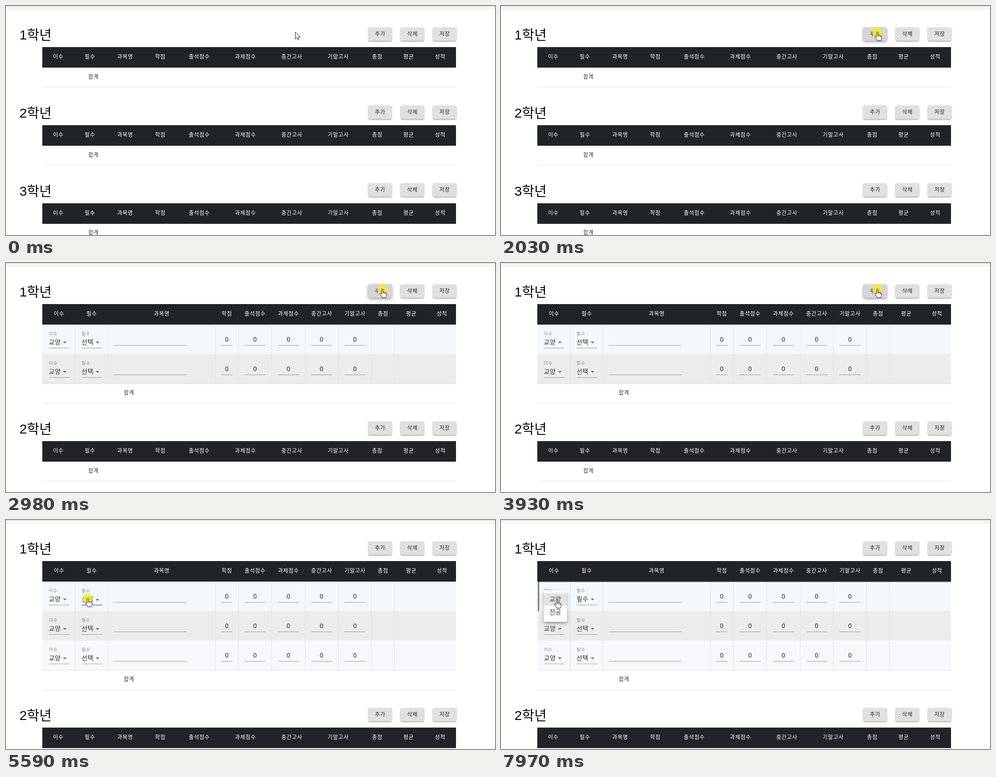
Recreate the animation shown at these times as an HTML page with a canvas. Size 1091x513 px, loop 8 s.

```html
<!DOCTYPE html>
<html lang="ko">
<head>
<meta charset="utf-8">
<style>
html, body { margin: 0; width: 100%; height: 100%; overflow: hidden; background: #fff; }
canvas { display: block; }
</style>
</head>
<body>
<canvas id="stage" width="1091" height="513"></canvas>
<script>
const ctx = document.getElementById('stage').getContext('2d');
const LOOP = 8000, ROW = 66.1, SECTION = 174.7;
const KR = '"Noto Sans CJK KR", "Noto Sans CJK", sans-serif';

const heads = ['이수', '필수', '과목명', '학점', '출석점수', '과제점수', '중간고사', '기말고사', '총점', '평균', '성적'];
const emptyCols = [116.5, 187, 265.5, 344, 431, 534, 637.5, 741, 828, 898, 968.5];
const filledCols = [118, 191, 347, 492.5, 555.5, 630, 704, 778.5, 841, 904, 972.5];
const dividers = [154, 227, 467, 518, 592, 667, 741, 815, 866];
const buttons = [[808, '추가'], [880, '삭제'], [952, '저장']];
const rowFills = ['#f4f8fb', '#ebecee', '#f6f8fb'];
const addTimes = [2100, 2980, 4000];
const presses = [[1960, 2200], [2840, 3060], [3860, 4080], [5560, 5760], [6460, 6560], [7820, 7880]];

// time, x, y of the pointer's hot spot
const path = [
  [0, 645, 58], [240, 645, 58], [330, 654, 59], [800, 654, 59], [1630, 849, 59],
  [1690, 847, 58], [1760, 839, 58], [4640, 839, 58], [5320, 182, 175],
  [5760, 182, 175], [6260, 193, 147], [6620, 193, 147], [7220, 127, 177],
  [7370, 124, 178], [LOOP, 124, 178]
];
const arrow = new Path2D('M0 0V15.5L3.6 12.2L6 17.5L8.5 16.4L6.2 11.3H11Z');
const hand = new Path2D('M-1.5 11V1.5a1.5 1.5 0 0 1 3 0V7q2-1 3 .6q2-1 2.7 .8q2.3-.5 2.3 1.8V14q0 2-1.5 3.5V19H-.5V17.5L-5 11.5q-1-2 1-2q1 0 2.5 1.5Z');

const clamp = v => Math.max(0, Math.min(1, v));
const ramp = (t, start, length) => clamp((t - start) / length);
const mix = (a, b, k) => a + (b - a) * k;
const easeOut = k => 1 - (1 - k) ** 3;
const between = (t, a, b) => t >= a && t < b;

function rect(x, y, w, h, color) {
  ctx.fillStyle = color;
  ctx.fillRect(x, y, w, h);
}

function text(str, x, cy, size, color, { align = 'center', font = KR, gap = 0 } = {}) {
  ctx.font = `${size}px ${font}`;
  ctx.letterSpacing = gap + 'px';
  ctx.textAlign = align;
  ctx.fillStyle = color;
  ctx.fillText(str, x, cy + size * .37);
}

function card(x, y, w, h, color, shadows) {
  ctx.fillStyle = color;
  ctx.beginPath();
  ctx.roundRect(x, y, w, h, 3);
  for (const [dy, blur, alpha] of shadows) {
    ctx.shadowColor = `rgba(0,0,0,${alpha})`;
    ctx.shadowOffsetY = dy;
    ctx.shadowBlur = blur;
    ctx.fill();
  }
  ctx.shadowColor = 'transparent';
}

function dot(x, y, r, color) {
  ctx.fillStyle = color;
  ctx.beginPath();
  ctx.arc(x, y, r, 0, 7);
  ctx.fill();
}

function pointerAt(t) {
  const i = path.findIndex(p => p[0] > t);
  const [t0, x0, y0] = path[i - 1], [t1, x1, y1] = path[i];
  const k = ramp(t, t0, t1 - t0), s = k * k * (3 - 2 * k);
  return [mix(x0, x1, s), mix(y0, y1, s)];
}

function drawButton(x, y, label, lift, hover) {
  const tone = Math.round(mix(224, 213, hover));
  card(x + .5, y, 52, 30, `rgb(${tone},${tone},${tone})`,
    [[mix(1.5, 3, lift), mix(2, 6, lift), .28], [1, mix(4, 9, lift), .16]]);
  text(label, x + 26.8, y + 14.7, 12, '#222', { gap: .7 });
}

function drawSelect(x, y, label, value, open, focus) {
  text(label, x, y + 20, 10, '#85888b', { align: 'left', gap: .5 });
  text(value, x, y + 39, 14, '#2c2e30', { align: 'left', gap: .4 });
  const dir = open ? -1 : 1, cy = y + 40;
  ctx.fillStyle = '#70757a';
  ctx.beginPath();
  ctx.moveTo(x + 31.5, cy - 2 * dir);
  ctx.lineTo(x + 40, cy - 2 * dir);
  ctx.lineTo(x + 35.75, cy + 2.2 * dir);
  ctx.fill();
  rect(x, y + 52, 46, 1, open ? '#333' : '#949699');
  if (focus) rect(x + 23 - 23 * focus, y + 51.5, 46 * focus, 1.5, '#1f63b5');
}

function drawRow(r, t) {
  const y = Math.round(138 + ROW * r), first = r === 0;
  rect(81, y, 923, 66, rowFills[r]);
  for (const x of dividers) rect(x, y, 1, 66, '#e1e4e7');
  rect(81, y + 66, 923, 1, '#dcdee0');
  if (first && t >= 6530) {
    rect(81, y, 923, 1.6, '#a9abad');
    rect(82, y, 3.5, 66, '#808284');
    rect(81, y + 66, 923, 1, '#c8cacc');
  }
  drawSelect(95.5, y, '이수', '교양', first && t >= 7850, first ? ramp(t, 7850, 200) : 0);
  drawSelect(168.5, y, '필수', first && t >= 6500 ? '필수' : '선택',
    first && between(t, 5580, 6530),
    first ? ramp(t, 5560, 200) * (1 - ramp(t, 7830, 120)) : 0);
  rect(241, y + 46, 162, 1, '#949699');
  for (let c = 3; c < 8; c++) {
    const w = c === 3 ? 25 : 47;
    text('0', filledCols[c], y + 33, 14, '#222', { font: '"Noto Sans", sans-serif' });
    rect(Math.round(filledCols[c] - w / 2), y + 46, w, 1, '#949699');
  }
}

function drawSection(i, rows, t) {
  const top = SECTION * i + (i ? ROW * rows : 0);
  const filled = i === 0 && rows > 0;
  const cols = filled ? filledCols : emptyCols;
  const bodyEnd = top + (filled ? ROW * rows : 0);

  text(i + 1 + '학년', 30, top + 64, 30, '#080808', { align: 'left', font: '"Liberation Sans", ' + KR });
  buttons.forEach(([x, label], b) => {
    let hover = 0, lift = 0;
    if (i === 0 && b === 0) {
      hover = ramp(t, 1480, 200) * (1 - ramp(t, 4680, 200));
      const push = Math.max(...presses.slice(0, 3).map(([a, z]) => ramp(t, a, 100) * (1 - ramp(t, z, 200))));
      lift = Math.max(hover * .5, push);
    }
    drawButton(x, Math.round(top + 48), label, lift, hover);
  });

  const headY = Math.round(top + 92.3);
  rect(81, headY, 923, 46, '#202428');
  heads.forEach((h, c) => text(h, cols[c] + .3, headY + 21.8, 12, '#fff', { gap: .7 }));
  if (filled) for (let r = 0; r < rows; r++) drawRow(r, t);
  text('합계', filled ? 274.5 : 195.3, Math.round(bodyEnd + 159), 12, '#303336', { gap: .7 });
  rect(81, Math.round(bodyEnd + 181.3), 923, 1, '#e0e1e2');
}

function drawMenu(x, y, items, selected, hovered, grow, alpha) {
  if (alpha <= 0) return;
  ctx.save();
  ctx.globalAlpha = alpha;
  const cx = x + 26, cy = y + 20 + 29 * selected;
  ctx.translate(cx, cy);
  ctx.scale(mix(.75, 1, grow), mix(.5625, 1, grow));
  ctx.translate(-cx, -cy);
  card(x, y, 53, 72, '#fff', [[4, 5, .2], [3, 11, .2]]);
  items.forEach((label, i) => {
    const shade = (i === selected ? .07 : 0) + (i === hovered ? .04 : 0);
    rect(x, y + 6 + 29 * i, 53, 29, `rgba(0,0,0,${shade})`);
    text(label, x + 13.3, y + 20 + 29 * i, 14, '#2c2e30', { align: 'left', gap: .4 });
  });
  ctx.restore();
}

function drawPointer(t) {
  const [x, y] = pointerAt(t);
  if (presses.some(([a, b]) => between(t, a, b))) dot(x, y, 11, 'rgba(250,238,30,.72)');
  const overSelect = y > 150 && y < 192 && (between(x, 95, 142) || between(x, 168, 215));
  const isHand = between(x, 808, 861) || overSelect || between(t, 5660, 6640);
  const shape = isHand ? hand : arrow;
  ctx.save();
  ctx.translate(x + .5, y + .5);
  ctx.fillStyle = '#fff';
  ctx.strokeStyle = '#111';
  ctx.lineWidth = 1;
  ctx.fill(shape);
  ctx.stroke(shape);
  if (isHand) ctx.stroke(new Path2D('M1.5 7V10M4.5 8V10.5M7.2 9V11'));
  ctx.restore();
}

function draw(t) {
  rect(0, 0, 1091, 513, '#fff');
  rect(0, 0, 1091, 8, '#f6f6f6');
  rect(0, 0, 1091, 1, '#cfcfcf');
  rect(0, 7, 1091, 1, '#ebebeb');

  const rows = addTimes.filter(a => t >= a).length;
  for (let i = 0; i < 3; i++) drawSection(i, rows, t);

  const openA = easeOut(ramp(t, 5640, 200)), openB = easeOut(ramp(t, 7850, 200));
  const fade = 1 - ramp(t, 6560, 220);
  drawMenu(167, 127.5, ['필수', '선택'], 1, pointerAt(t)[1] < 162 ? 0 : 1, openA, openA * fade);
  if (between(t, 6470, 6780)) dot(193, 147, 12, `rgba(0,0,0,${.22 * fade})`);
  drawMenu(94.7, 157.3, ['교양', '전공'], 0, 0, openB, openB);
  drawPointer(t);
}

const start = performance.now();
function tick() {
  draw((performance.now() - start) % LOOP);
  requestAnimationFrame(tick);
}
tick();
</script>
</body>
</html>
```
